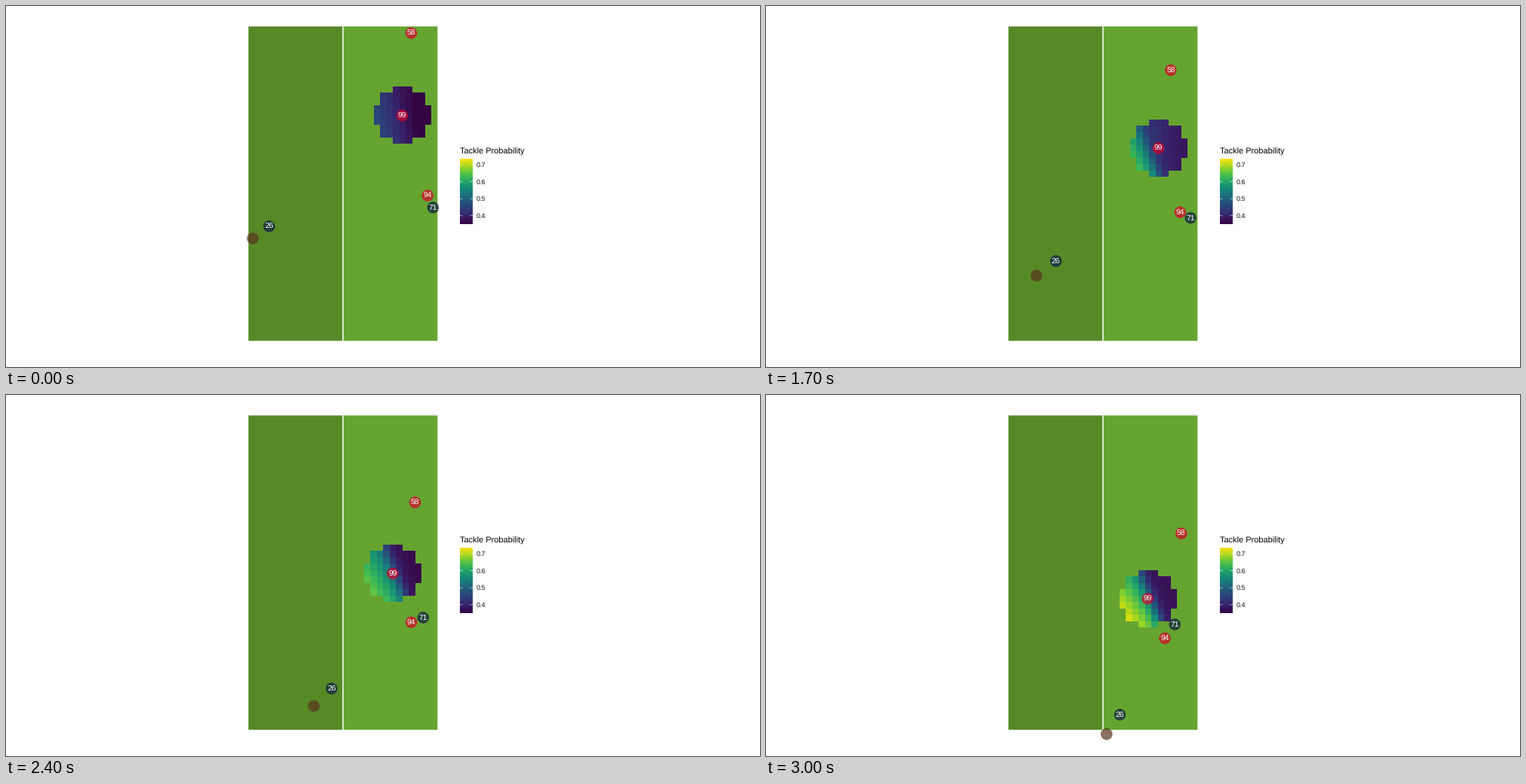
Write a matplotlib script that moves like this. It is 1000 by 480 pixels and loops after 4.1 s.

```python
import numpy as np
import matplotlib.pyplot as plt
from matplotlib.animation import FuncAnimation
from matplotlib.colors import ListedColormap
from matplotlib.patches import Circle, Rectangle

plt.rcParams["text.hinting"] = "none"

W, H, DPI = 1000, 480, 100
FRAMES, INTERVAL = 41, 100
HOLD, STEPS, BEATS = 10, 20, 18   # still frames, moving frames, tracked moments
YARD, REACH = 8.36, 4             # pixels per yard, heat map half width in cells
LEFT, TOP = 321.5, 27.2

RED, NAVY, BROWN = "#d7042d", "#0c1c41", "#58341c"

# name: colour, then start, velocity and acceleration term for x and for y
MARKERS = {
    "ball": (BROWN, (327.3, 4.41, .139), (309, 8.42, -.03)),
    "26": (NAVY, (349, 5.55, .063), (293, 7.86, -.029)),
    "71": (NAVY, (566.3, -.12, -.068), (268, 2.4, -.019)),
    "58": (RED, (537.4, -.52, .07), (36, 8.22, 0)),
    "94": (RED, (559, -1.58, -.005), (252, 3.56, .023)),
    "99": (RED, (525.4, -.71, -.02), (145.6, 7.34, -.021)),
}


def beat(frame):
    """Tracked moment shown at a frame; moments land on whole frames."""
    moments = np.arange(BEATS + 1)
    landing = np.round(moments * STEPS / BEATS)
    return np.interp(frame - HOLD, landing, moments)


def place(name, u):
    _, *axes = MARKERS[name]
    return [start + v * u + a * u**2 for start, v, a in axes]


def deepen(rgba):
    """Re-encode sRGB colours with a 1.8 gamma."""
    out = np.array(rgba)
    c = out[:, :3]
    linear = np.where(c < .04045, c / 12.92, ((c + .055) / 1.055)**2.4)
    out[:, :3] = linear**(1 / 1.8)
    return out


SCALE = ListedColormap(deepen(plt.cm.viridis(np.linspace(0, 1, 256))))

J, I = np.mgrid[-REACH:REACH + 1, -REACH:REACH + 1]
DISC = I**2 + J**2 <= 18


def heat(u):
    """Low on the right, a ridge on the left that grows toward the bottom."""
    p = u / BEATS
    bump = np.exp(-((u - 6) / 3)**2)
    base = .06 + .1 * bump - .03 * (1 - p) * I
    high = .05 + .55 * p**.75
    tilt = .01 + .045 * p + .015 * bump
    edge = .5 - 2.3 * bump + .4 * J
    ridge = 1 / (1 + np.exp((I - edge) / .6))
    v = base + ridge * (high + tilt * (.75 * J - I))
    rgba = SCALE(np.clip(v, 0, 1))
    rgba[..., 3] = DISC
    return rgba


fig = plt.figure(figsize=(W / DPI, H / DPI), dpi=DPI, facecolor="white")
ax = fig.add_axes([0, 0, 1, 1])
ax.set_xlim(0, W)
ax.set_ylim(H, 0)
ax.axis("off")


def px(n):
    return n * 72 / DPI


def label(x, y, s, size, **kw):
    return ax.text(x, y, s, fontsize=px(size), family="Liberation Sans",
                   va="baseline", **kw)


def line(xs, ys, width):
    ax.plot(xs, ys, color="white", lw=px(width), solid_capstyle="butt",
            snap=False)


# Field
half, depth = 15 * YARD, 50 * YARD
for n, color in enumerate(("#568a27", "#66a430")):
    ax.add_patch(Rectangle((LEFT + n * half, TOP), half, depth, fc=color,
                           lw=0, snap=False))
line([LEFT + half] * 2, [TOP, TOP + depth], 1.5)

# Legend
label(601.5, 197, "Tackle Probability", 11, color="black")
ax.imshow(np.linspace(1, 0, 256)[:, None], cmap=SCALE, aspect="auto",
          extent=(602, 619, 290, 203.6))
for n in range(4):
    y = 278.8 - 22.6 * n
    for x in (602, 615.5):
        line([x, x + 3.5], [y, y], .6)
    label(624, y + 3.2, f"{.4 + n / 10:.1f}", 9, color="#111111")

tiles = ax.imshow(heat(0), aspect="auto", interpolation="nearest", zorder=3)

dots = {}
for z, (name, (color, *_)) in enumerate(MARKERS.items(), 4):
    dot = ax.add_patch(Circle((0, 0), 7.8, fc=color, alpha=.7, lw=0, zorder=z))
    text = label(0, 0, name if name.isdigit() else "", 10.2, color="white",
                 ha="center", zorder=z + .5)
    dots[name] = dot, text


def draw(frame):
    u = beat(frame)
    for name, (dot, text) in dots.items():
        x, y = place(name, u)
        dot.center = x, y
        text.set_position((x, y + 3.4))
    x, y = place("99", u)
    r = YARD * (REACH + .5)
    tiles.set_data(heat(u))
    tiles.set_extent((x - r, x + r, y + r, y - r))
    return [tiles]


anim = FuncAnimation(fig, draw, frames=FRAMES, interval=INTERVAL,
                     repeat=True, repeat_delay=0)
plt.show()
```
